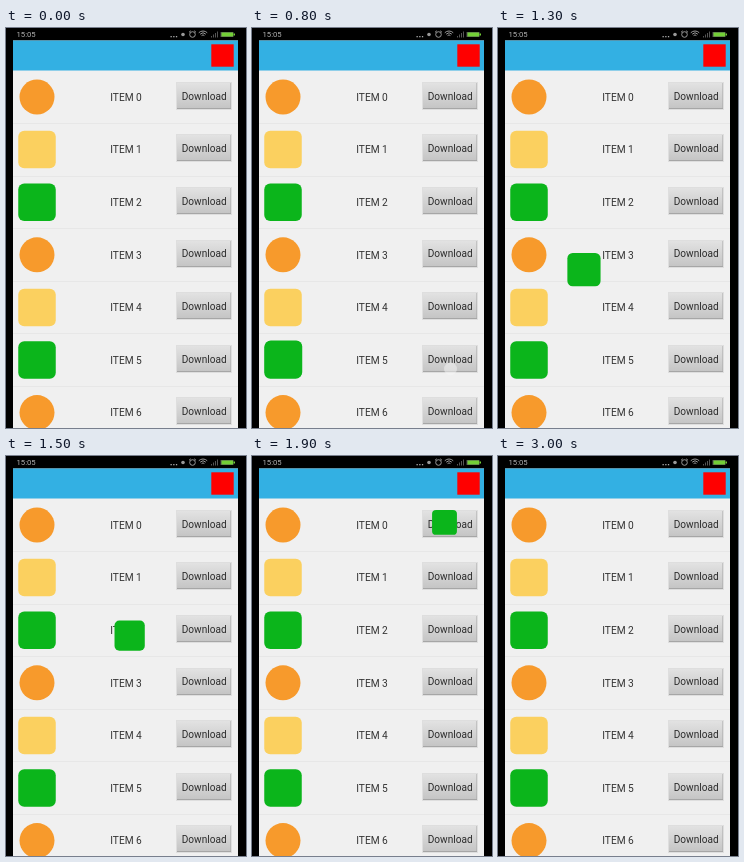
These frames come from a looping animation (240 by 400 pixels, 3600 ms). An HTML page with a canvas:

```html
<!DOCTYPE html>
<html lang="en">
<head>
<meta charset="utf-8">
<title>Download list</title>
<style>
  html, body { margin: 0; height: 100%; overflow: hidden; background: #000; }
  canvas { display: block; width: 100vw; height: 100vh; }
</style>
</head>
<body>
<canvas id="stage" width="240" height="400"></canvas>
<script>
const ctx = document.getElementById('stage').getContext('2d');
const LOOP = 3600, STEP = 100, PITCH = 52.6;
const FLY_START = 750, FLY_TIME = 1500;
const GREEN = '#0bb51b';

const rowY = i => 69 + i * PITCH;
const mix = (a, b, k) => a + (b - a) * k;

function box(x, y, w, h, fill) {
  ctx.fillStyle = fill;
  ctx.fillRect(x, y, w, h);
}

function tile(x, y, size, fill, radius = size * 0.16) {
  ctx.fillStyle = fill;
  ctx.beginPath();
  ctx.roundRect(x - size / 2, y - size / 2, size, size, radius);
  ctx.fill();
}

function disc(x, y, r, fill) {
  tile(x, y, r * 2, fill, r);
}

function label(text, x, y, size, fill, align = 'center') {
  ctx.font = `${size}px Roboto, sans-serif`;
  ctx.textAlign = align;
  ctx.fillStyle = fill;
  ctx.fillText(text, x, y);
}

function button(y) {
  const top = Math.round(y - 15.2);
  box(170, top, 56, 28, '#dedede');
  box(171, top + 1, 54, 26, '#a6a6a6');
  const shade = ctx.createLinearGradient(0, top + 1, 0, top + 26);
  shade.addColorStop(0, '#e2e2e2');
  shade.addColorStop(1, '#c5c5c5');
  box(171, top + 1, 53.5, 25, shade);
  label('Download', 198.2, y + 2.5, 10.1, '#2c2c2c');
}

function row(i) {
  const y = rowY(i);
  const kind = i % 3;
  if (kind === 0) disc(31, y, 17.5, '#f79a2c');
  else tile(31, y, 37.5, kind === 1 ? '#fbd05f' : GREEN);
  label('ITEM ' + i, 120, y + 3.7, 10.2, '#333');
  button(y);
  box(7, Math.round(y + 26), 225, 1, '#e7e7e7');
}

function statusBar() {
  label('15:05', 10.5, 9.3, 7.7, '#b4b4b4', 'left');
  for (let i = 0; i < 3; i++) box(164.5 + i * 2.7, 8, 1.3, 1.3, '#aaa');
  disc(177, 6.5, 1.8, '#999');

  ctx.strokeStyle = '#999';
  ctx.lineWidth = 1;
  ctx.beginPath();
  ctx.arc(186.5, 6.5, 2.8, 0, Math.PI * 2);
  ctx.moveTo(183, 4.3);
  ctx.lineTo(184.8, 2.8);
  ctx.moveTo(188.2, 2.8);
  ctx.lineTo(190, 4.3);
  ctx.stroke();

  for (const r of [2, 4, 6]) {
    ctx.beginPath();
    ctx.arc(197, 9, r, -Math.PI * 0.75, -Math.PI * 0.25);
    ctx.stroke();
  }
  for (let i = 0; i < 4; i++) box(205 + i * 2, 8 - i * 1.5, 1, 1.5 + i * 1.5, '#555');

  tile(221, 6.5, 13, '#555', 1);
  box(214, 0, 15, 4, '#000');
  box(214, 9, 15, 4, '#000');
  box(215.5, 4.5, 11.5, 4, '#73cf37');
  box(227.5, 5.5, 1.5, 2, '#73cf37');
}

function flyingIcon(t) {
  const p = (t - FLY_START) / FLY_TIME;
  if (p <= 0 || p >= 1) return;
  const k = (1 - Math.cos(Math.PI * p)) / 2;
  tile(mix(31, 216.3, k), mix(332, 27.3, k), mix(37.5, 23, k), GREEN);
}

function draw(t) {
  box(0, 0, 240, 400, '#000');
  statusBar();
  box(7, 12.5, 225, 387.5, '#f0f0f0');
  box(7, 12.5, 225, 30, '#33b0e3');
  box(205.3, 16.3, 22.4, 22.4, '#f00');
  for (let i = 0; i < 7; i++) row(i);
  if (t >= 700 && t < 900) disc(198.5, 341, 6.5, 'rgba(245,245,245,.5)');
  flyingIcon(t);
}

function tick() {
  const t = performance.now() % LOOP;
  draw(Math.floor(t / STEP) * STEP);
  requestAnimationFrame(tick);
}
tick();
</script>
</body>
</html>
```
